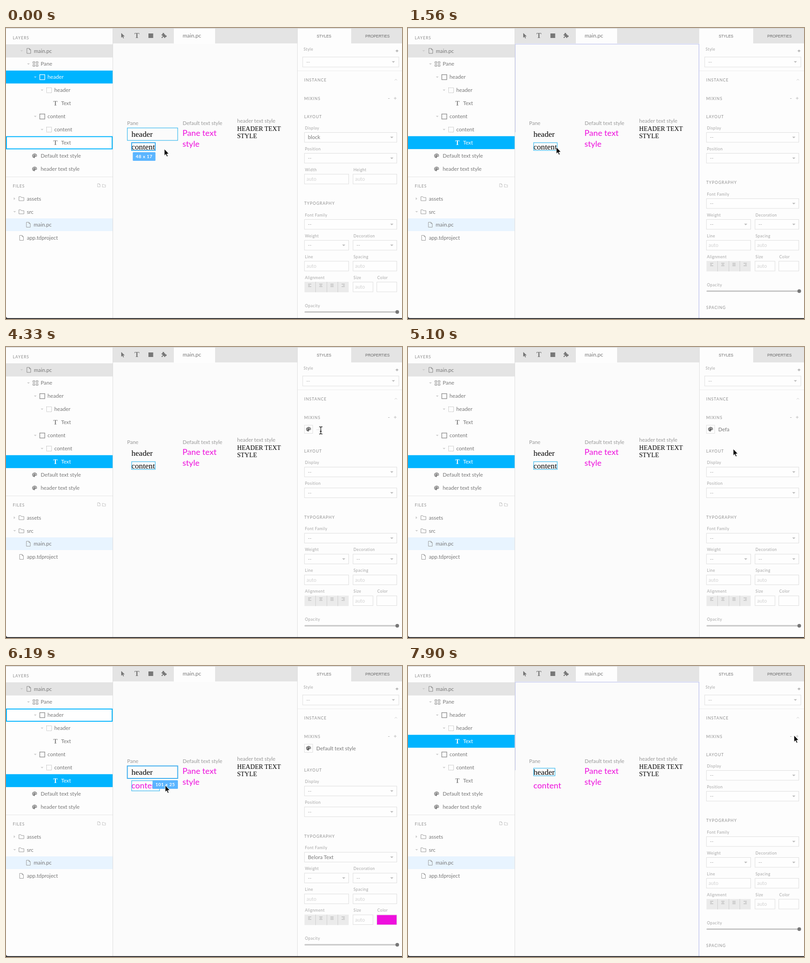
An HTML page for the animation above (7.99 s loop, 873 by 642 pixels).

```html
<!DOCTYPE html>
<html lang="en">
<head>
<meta charset="utf-8">
<title>Component editor</title>
<style>
html, body { margin: 0; width: 100%; height: 100%; overflow: hidden; background: #fdfdfd; }
svg { display: block; }
text { font-family: Lato, sans-serif; white-space: pre; }
.row { font-size: 11.7px; fill: #777; }
.tag { font-size: 11.5px; fill: #999; }
.head { font-size: 8.6px; letter-spacing: 1.05px; fill: #8d8d8d; }
.label { font-size: 8.7px; letter-spacing: .5px; fill: #a3a3a3; }
.value { font-size: 11.5px; fill: #777; }
.faint { font-size: 11px; fill: #d2d2d2; }
.none { font-size: 11px; fill: #aaa; }
.tab { font-family: "Liberation Sans", Arial, sans-serif; font-size: 8.4px; fill: #666; }
.badge { font-size: 10px; font-weight: 700; letter-spacing: .5px; fill: #fff; }
.serif { font-family: "Liberation Serif", serif; font-size: 17.6px; fill: #000; }
.caps { font-family: "Liberation Serif", serif; font-size: 14.1px; fill: #000; }
.pink { font-size: 18.1px; fill: #ee0fdd; }
.glyph { font-family: "Liberation Serif", serif; font-weight: 700; }
</style>
</head>
<body>
<svg id="stage" width="873" height="642" viewBox="0 0 873 642">
  <g id="ui"></g>
  <g id="cursor" stroke-linejoin="round" stroke-linecap="round"></g>
</svg>
<script>
const LOOP = 7990;
const BLUE = '#00b4ff', PINK = '#ee0fdd', GREY = '#e4e4e4';

// ---- timeline: [time, value] holds until the next entry ----
const selected = [[0, 'header'], [1480, 'text2'], [6990, 'text1']];
const hovered = [[0, 'text2'], [240, 'content'], [350, 'pane'], [640, 'content'], [760, 'text2'], [1480, ''],
  [5700, 'caps'], [5930, 'plain'], [6050, 'content'], [6170, 'header'], [6290, 'text1'], [6990, '']];
const focused = [[0, 0], [1480, 1], [3280, 0], [6700, 1]];
const mixin = [[0, 0], [3360, 1], [6990, 0]];
const styled = [[0, 0], [5460, 1]];
const pointer = [[0, 'arrow'], [3060, 'hand'], [3690, 'arrow'], [4130, 'beam'], [4960, 'arrow']];
const path = [[0, 349, 267], [60, 349, 267], [90, 349, 270], [180, 349, 270], [240, 352, 278], [430, 350, 312],
  [620, 340, 298], [880, 327, 265], [1000, 327, 265], [1060, 327, 264], [1180, 327, 263], [1880, 327, 263],
  [1950, 338, 241], [2040, 338, 241], [2100, 390, 190], [2300, 560, 122], [2400, 702, 101], [2520, 782, 122],
  [2660, 846, 158], [2960, 846, 158], [3020, 850, 157], [3190, 854, 155], [3620, 854, 155], [3690, 845, 168],
  [3900, 770, 221], [4100, 710, 205], [4330, 694, 184], [4600, 694, 184], [4800, 700, 190], [5100, 717, 225],
  [5560, 717, 225], [5640, 620, 238], [5760, 520, 242], [5870, 438, 252], [5980, 392, 262], [6090, 362, 280],
  [6200, 350, 262], [6300, 345, 240], [6400, 343, 231], [6700, 343, 231], [6810, 342, 229], [6920, 342, 229],
  [6990, 325, 236], [7100, 643, 190], [7250, 700, 183], [7400, 785, 174], [7540, 850, 155], [7840, 850, 155],
  [7900, 851, 153], [LOOP, 851, 153]];

const at = (keys, t) => keys.reduce((v, k) => k[0] <= t ? k[1] : v, keys[0][1]);

function place(t) {
  const i = path.findIndex(k => k[0] > t);
  const [a, b] = [path[i - 1], path[i]];
  const u = (t - a[0]) / (b[0] - a[0]);
  return [a[1] + (b[1] - a[1]) * u, a[2] + (b[2] - a[2]) * u];
}

function mixinText(t) {
  if (t < 4700) return '--';
  if (t >= 5280) return 'Default text style';
  return 'Defa'.slice(0, 1 + Math.floor((t - 4700) / 120));
}

// ---- drawing helpers ----
const text = (x, y, s, cls, more = '') => `<text x="${x}" y="${y}" class="${cls}" ${more}>${s}</text>`;
const rect = (x, y, w, h, fill, more = '') =>
  `<rect x="${x}" y="${y}" width="${w}" height="${h}" fill="${fill}" ${more}/>`;
const frame = (x, y, w, h, color, width = 1) => rect(x, y, w, h, 'none', `stroke="${color}" stroke-width="${width}"`);
const line = (d, color, width = 1) => `<path d="${d}" fill="none" stroke="${color}" stroke-width="${width}"/>`;
const fillPath = (d, fill) => `<path d="${d}" fill="${fill}"/>`;
const group = (x, y, body) => `<g transform="translate(${x} ${y})">${body}</g>`;

// icons are centred on 0,0
const icons = {
  file: c => line('M-4-5.5H1.5L4.5-2.5V5.5H-4ZM1.5-5.5V-2.5H4.5', c),
  folder: c => line('M-5.5 4.5V-4.5H-1.5L0-2.5H5.5V4.5Z', c),
  pane: c => [-5.5, 1.5].map(x => frame(x, -5, 4, 3.5, c) + frame(x, 1.5, 4, 3.5, c)).join(''),
  box: c => frame(-5.5, -5.5, 11, 11, c, 1.3),
  slot: c => rect(-5.5, -5.5, 11, 11, 'none', `stroke="${c}" stroke-dasharray="1.5 1" opacity=".65"`),
  type: c => text(0, 4.7, 'T', 'glyph', `font-size="14" text-anchor="middle" fill="${c}"`),
  palette: c => fillPath('M0-5C3-5 5.3-3 5.3-.4 5.3 2 3 2 1.7 2 .2 2 1.6 4.8 0 4.8-3 4.8-5.3 2.6-5.3 0S-3-5 0-5Z', c) +
    [[-3, .3], [-1.7, -2.4], [1.4, -2.6], [3.2, -.6]].map(p => `<circle cx="${p[0]}" cy="${p[1]}" r=".9" fill="#fdfdfd"/>`).join('')
};
const arrowDown = (x, y, c = '#bbb', s = 3.5) => fillPath(`M${x - s} ${y - s / 2}h${s * 2}l${-s} ${s}Z`, c);

// ---- left side ----
const layers = [
  ['main', 'main.pc', 0, 'file'], ['pane', 'Pane', 1, 'pane'], ['header', 'header', 2, 'box'],
  ['slot1', 'header', 3, 'slot'], ['text1', 'Text', 4, 'type'], ['content', 'content', 2, 'box'],
  ['slot2', 'content', 3, 'slot'], ['text2', 'Text', 4, 'type'],
  ['plain', 'Default text style', 1, 'palette'], ['caps', 'header text style', 1, 'palette']];

function layerRow([id, name, depth, icon], i, s) {
  const y = 36 + i * 28.95, mid = y + 14.5, on = s.sel === id;
  const x = 50 + depth * 15 - (icon === 'palette' ? 2 : 0);
  let out = '';
  if (!i) out += rect(0, y, 235, 29, GREY);
  if (on) out += rect(0, y, 235, 28.5, BLUE);
  if (s.hover === id) out += rect(1, y + 1, 233, 27, '#fff', `stroke="${BLUE}" stroke-width="2"`);
  if (!['type', 'palette'].includes(icon)) out += arrowDown(x - 15.5, mid, on ? '#8fdcff' : '#ccc', 3);
  return out + group(x - (icon === 'type' ? 1 : 0), mid, icons[icon](on ? '#fff' : '#888')) +
    text(61.5 + depth * 15, mid + 4, name, 'row', on ? 'style="fill:#fff"' : '');
}

function leftSide(s) {
  const fileRow = (x, y, icon, name) => group(x, y, icons[icon]('#999')) + text(x + 12, y + 4, name, 'row');
  return rect(0, 0, 236, 642, '#fdfdfd') + text(15, 25, 'LAYERS', 'head') +
    layers.map((l, i) => layerRow(l, i, s)).join('') +
    line('M0 328.5H235', '#e6e6e6') + text(15, 352, 'FILES', 'head') +
    group(204.5, 347, `<g transform="scale(.65)">${icons.file('#aaa')}</g>`) +
    group(216, 348, `<g transform="scale(.65)">${icons.folder('#aaa')}</g>`) +
    rect(0, 420, 235, 28, '#e8f4ff') +
    fillPath('M17 373.5V379.5L20.5 376.5Z', '#ccc') + arrowDown(19, 405.5, '#ccc', 3) +
    fileRow(34, 376.5, 'folder', 'assets') + fileRow(34, 405.5, 'folder', 'src') +
    fileRow(49, 434, 'file', 'main.pc') + fileRow(34, 463, 'file', 'app.tdproject') +
    line('M235.5 0V642', '#dcdcdc');
}

// ---- canvas ----
function bounds(id, done) {
  return {
    pane: [267.5, 220.5, 111, 105.5, '101 x 96'],
    header: [267.5, 220.5, 111, 27.5, '101 x 25'],
    content: [267.5, 248, 111, 78, '101 x 71'],
    text1: [277, 225.5, 47, 16.8, '43 x 17'],
    text2: done ? [277, 253, 61.5, 22.5, '56 x 20'] : [277, 253, 52, 17, '48 x 17'],
    plain: [389.5, 221, 117, 47, '106 x 43'],
    caps: [510, 216, 116.5, 34.5, '106 x 34']
  }[id];
}

function hoverBox(id, done) {
  const [x, y, w, h, size] = bounds(id, done);
  const bw = size.length > 7 ? 56 : 50, bx = x + w - bw + .5, by = y + h + 4;
  return frame(x, y, w, h, '#40aeef', 2) +
    rect(bx, by, bw, 19, '#56b3ff', 'rx="1.5" opacity=".97"') +
    text(bx + bw / 2, by + 13, size, 'badge', 'text-anchor="middle"');
}

function canvas(s) {
  let out = rect(236, 34, 406, 608, '#fbfbfb') + rect(236, 0, 406, 34, GREY) + rect(370, 1, 91, 34, '#fdfdfd') +
    fillPath('M254 11V21.5L256.7 19.2 258.4 23 260 22.2 258.3 18.6H261.8Z', '#777') +
    text(288.5, 21.5, 'T', 'glyph', 'font-size="16" text-anchor="middle" fill="#777"') +
    rect(314, 12, 10.5, 10, '#777') +
    fillPath('M343 14H345.3A2 2 0 1 1 348.5 14H351V16.5A2 2 0 1 1 351 19.7V22H348.7A1.8 1.8 0 1 0 345.4 22H343V19.5A1.7 1.7 0 1 0 343 16.5Z', '#777') +
    text(389.5, 20.5, 'main.pc', 'row', 'style="font-size:12px"') +
    text(267, 214, 'Pane', 'tag') + text(389.5, 214, 'Default text style', 'tag') + text(509.5, 209, 'header text style', 'tag') +
    text(276.5, 240, 'header', 'serif') +
    (s.done ? text(276.5, 270, 'content', 'pink') : text(276.5, 267.5, 'content', 'serif')) +
    text(389, 238, 'Pane text', 'pink') + text(389, 261.5, 'style', 'pink') +
    text(509.5, 227, 'HEADER TEXT', 'caps') + text(509.5, 243, 'STYLE', 'caps');
  const [x, y, w, h] = bounds(s.sel, s.done);
  out += frame(x, y, w, h, '#45bdf0', 1.3);
  if (s.hover) out += hoverBox(s.hover, s.done);
  if (s.focus) out += line('M236.5 230V35.5H641.5V640', '#c6cbf0', 1.3);
  return out;
}

// ---- right side ----
const field = (x, y, w, h = 22.5) => rect(x + .5, y + .5, w - 1, h - 1, '#fefefe', 'stroke="#dedede"');
const pick = (x, y, w, label, value) => text(x + 1.5, y - 6.5, label, 'label') + field(x, y, w) +
  text(x + 8, y + 15.3, value || '--', value ? 'value' : 'none') + arrowDown(x + w - 11.5, y + 11.5);
const input = (x, y, w, label) => text(x + 1.5, y - 6.5, label, 'label') + field(x, y, w) +
  text(x + 5, y + 15.3, 'auto', 'faint');

function typography(pink) {
  const bars = [[7, 4, 7, 4], [7, 5, 7, 5], [7, 7, 7, 7], [7, 4, 7, 4]];
  const align = bars.map((b, i) => {
    const mid = 669.5 + i * 24.6;
    return b.slice(0, 3).map((w, j) => {
      const x = i === 0 ? mid - 3.5 : i === 3 ? mid + 3.5 - w : mid - w / 2;
      return rect(x, 518.5 + j * 2.8, w, 1, '#aaa');
    }).join('');
  }).join('');
  return text(657.5, 344, 'TYPOGRAPHY', 'head') +
    pick(657.5, 376, 204.5, 'Font Family', pink && 'Belora Text') +
    pick(657.5, 422, 98.5, 'Weight') + pick(764.5, 422, 97.5, 'Decoration') +
    input(657.5, 468, 98.5, 'Line') + input(764.5, 468, 97.5, 'Spacing') +
    text(659, 507.5, 'Alignment', 'label') + rect(658, 514, 97.5, 23, '#ebebeb') +
    line('M682.5 514V537M707.5 514V537M731.5 514V537', '#cfcfcf') + align +
    input(764.5, 514, 45, 'Size') + text(818.5, 507.5, 'Color', 'label') + field(817, 514, 45) +
    (pink ? rect(818, 515, 43, 21, PINK) : '') +
    text(659, 569.5, 'Opacity', 'label') + rect(658, 579, 204, 3, '#c6c6c6', 'rx="1.5"') +
    '<circle cx="862.5" cy="580.5" r="4" fill="#777"/>' +
    text(657.5, 620, 'SPACING', 'head');
}

function rightSide(s) {
  const block = s.sel === 'header';
  const layout = text(657.5, 198.5, 'LAYOUT', 'head') +
    pick(657.5, 230, 204.5, 'Display', block && 'block') + pick(657.5, 276, 204.5, 'Position') +
    (block ? input(657.5, 322, 98.5, 'Width') + input(764.5, 322, 97.5, 'Height') : '') +
    group(0, block ? 46 : 0, typography(s.mix && s.done));
  const mixRow = s.mix ? field(657.5, 172, 19, 19) + group(667, 181.5, icons.palette('#666')) +
    text(684, 185.5, s.typed, s.typed === '--' ? 'faint' : 'value') : '';
  return rect(642, 0, 231, 642, '#fdfdfd') + rect(761, 0, 112, 34, GREY) +
    text(701, 20.5, 'STYLES', 'tab', 'text-anchor="middle"') + text(819, 20.5, 'PROPERTIES', 'tab', 'text-anchor="middle"') +
    text(656, 50, 'Style', 'label') + line('M859 50.5H865M862 47.5V53.5', '#888') +
    field(653.5, 63.5, 213, 23) + text(662, 79, '--', 'none') + arrowDown(854, 75) +
    line('M642 94.5H873', '#ececec') + text(657.5, 117.8, 'INSTANCE', 'head') +
    line('M857 115.5Q859.5 111 862 115.5', '#ccc') + text(657.5, 158.5, 'MIXINS', 'head') +
    line('M842.5 155.5H845.5', '#aaa') + line('M855 155H861M858 152V158', '#bbb') +
    mixRow + group(0, s.mix ? 34.5 : 0, layout) + (s.focus ? '' : line('M642.5 0V642', '#dedede'));
}

const chrome = rect(0, 0, 873, 1.3, '#d4d4d4') +
  fillPath('M0 636Q.5 640 4 640H873V642H0Z', '#2b2b2e');

const cursors = {
  arrow: '<path d="M0 0V14.5L3.3 11.6 5.6 17 8 16 5.7 10.8H10Z" fill="#000" stroke="#fff" stroke-width="1"/>',
  hand: '<path d="M4 10V2.2Q4 .8 5.2 .8T6.4 2.2V6.2Q7.6 5.2 8.6 6.6 9.8 5.8 10.5 7.2 12 6.8 12 8.4V12Q12 14 10.6 16.8H5Q4 14.5 1 11.2 .2 9.6 1.6 9.2 3 9 4 10ZM6.4 6.4V9M8.6 6.8V9M10.5 7.4V9.2" fill="#fff" stroke="#000" stroke-width="1.1"/>',
  beam: '<path d="M-3-8Q0-8 0-6.5 0-8 3-8M0-6.5V6.5M-3 8Q0 8 0 6.5 0 8 3 8M-1.5 2H1.5" fill="none" stroke="#fff" stroke-width="2.6"/>' +
    '<path d="M-3-8Q0-8 0-6.5 0-8 3-8M0-6.5V6.5M-3 8Q0 8 0 6.5 0 8 3 8M-1.5 2H1.5" fill="none" stroke="#111" stroke-width="1.3"/>'
};

const ui = document.getElementById('ui'), cursor = document.getElementById('cursor');
let lastKey = '', lastShape = '';

function draw(t) {
  const s = { sel: at(selected, t), hover: at(hovered, t), focus: at(focused, t),
    mix: at(mixin, t), done: at(styled, t), typed: mixinText(t) };
  const key = JSON.stringify(s);
  if (key !== lastKey) {
    ui.innerHTML = canvas(s) + leftSide(s) + rightSide(s) + (s.focus ? line('M641.5 35V640', '#c6cbf0', 1.5) : '') + chrome;
    lastKey = key;
  }
  const shape = at(pointer, t), [x, y] = place(t);
  if (shape !== lastShape) cursor.innerHTML = cursors[lastShape = shape];
  cursor.setAttribute('transform', `translate(${x.toFixed(1)} ${y.toFixed(1)})`);
}

const start = performance.now();
function tick() {
  draw((performance.now() - start) % LOOP);
  requestAnimationFrame(tick);
}
tick();
</script>
</body>
</html>
```
